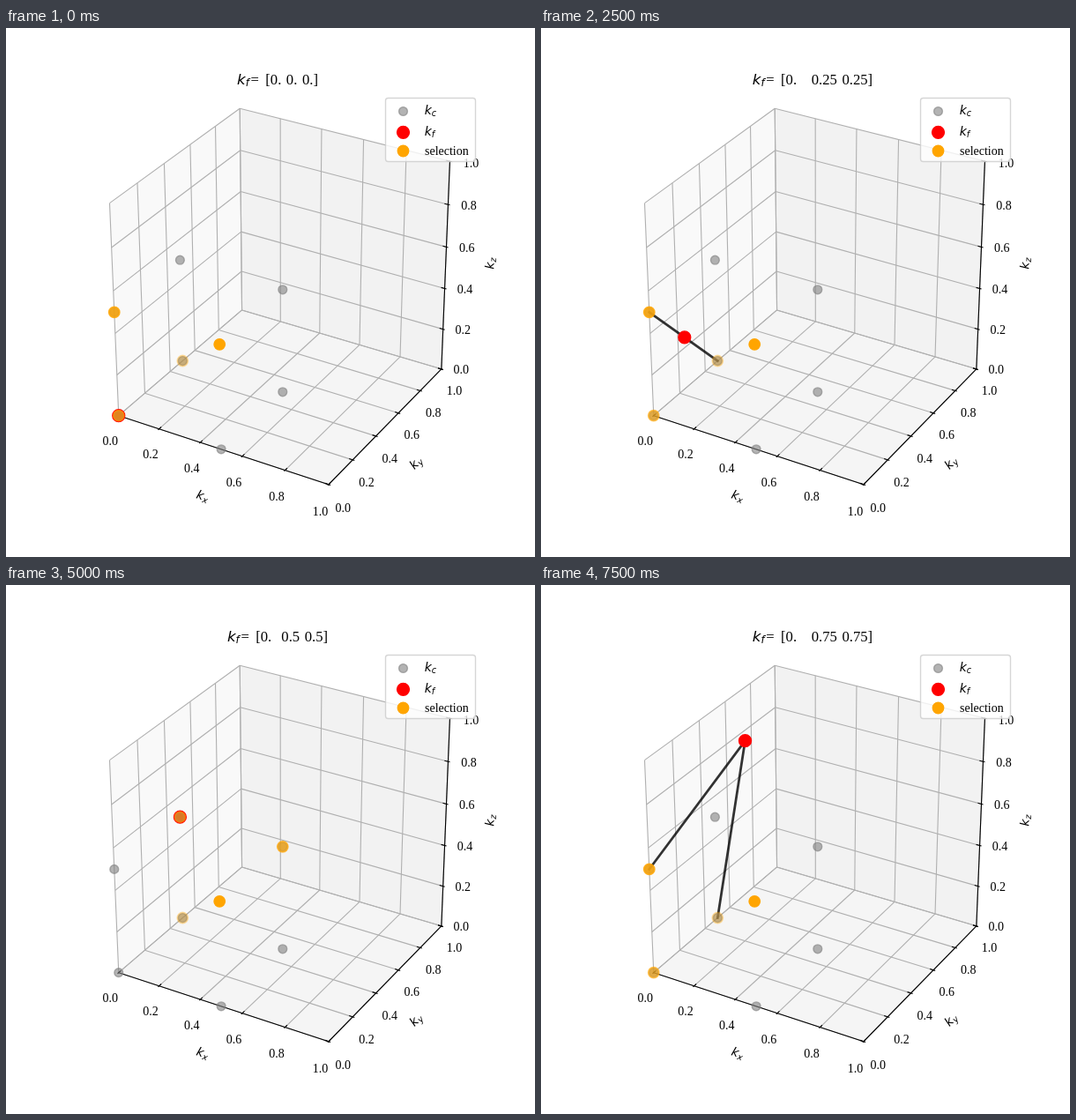
Write an HTML page with a canvas that moves like this. It is 600 px wide and 600 px high and loops after 8000 ms.

```html
<!DOCTYPE html>
<html lang="en">
<head>
<meta charset="utf-8">
<title>k-point interpolation</title>
<style>
html, body { margin: 0; width: 100%; height: 100%; overflow: hidden; background: #fff; }
canvas { display: block; }
</style>
</head>
<body>
<canvas id="c" width="600" height="600"></canvas>
<script>
const ctx = document.getElementById('c').getContext('2d');
const STEP = 500, COUNT = 16;
const SERIF = '"Liberation Serif", "Noto Serif", serif';
const SANS = '"DejaVu Sans", sans-serif';
const TICKS = [0, 0.2, 0.4, 0.6, 0.8, 1];

// Coarse points are numbered 0..7 by the bits x, y, z (each bit is 0.5).
const coarse = [0, 1, 2, 3, 4, 5, 6, 7].map(i => [(i >> 2) / 2, (i >> 1 & 1) / 2, (i & 1) / 2]);
const NEAREST = '5';
// Selected tetrahedron and the two interpolation ends for each fine point.
const picks = ['0125', '0125', '1235', '0135', '0125', '0125', '1235', '0135',
  '2357', '2357', '2357', '0235', '0124', '1237', '1357', '0125'];
const ends = ['', '01', '', '01', '02', '12', '13', '03',
  '', '23', '', '23', '02', '12', '13', '12'];

// Perspective view at elevation 30, azimuth -60.
function project([x, y, z]) {
  x -= 0.5; y -= 0.5; z -= 0.5;
  const w = 10 - 1.056 * (0.433 * x - 0.75 * y + 0.5 * z);
  const k = 2750 / w;
  return {
    x: 313.8 + k * (0.866 * x + 0.5 * y),
    y: 296.8 - k * (-0.25 * x + 0.433 * y + 0.866 * z),
    w
  };
}

function path(points) {
  ctx.beginPath();
  for (const p of points) {
    const q = project(p);
    ctx.lineTo(q.x, q.y);
  }
}

function line(a, b, color, width) {
  path([a, b]);
  ctx.strokeStyle = color;
  ctx.lineWidth = width;
  ctx.stroke();
}

function pane(color, ...corners) {
  path(corners);
  ctx.fillStyle = color;
  ctx.fill();
}

function dot(x, y, r, color, alpha) {
  ctx.globalAlpha = alpha;
  ctx.fillStyle = ctx.strokeStyle = color;
  ctx.lineWidth = 1.39;
  ctx.beginPath();
  ctx.arc(x, y, r, 0, 2 * Math.PI);
  ctx.fill();
  ctx.stroke();
  ctx.globalAlpha = 1;
}

const grayDot = (x, y) => dot(x, y, 4.91, '#808080', 0.6);
const redDot = (x, y) => dot(x, y, 6.94, '#f00', 1);
const orangeDot = (x, y, alpha) => dot(x, y, 6.21, '#ffa500', alpha);

function text(str, x, y, font, align = 'left') {
  ctx.font = font;
  ctx.textAlign = align;
  ctx.fillStyle = '#000';
  ctx.fillText(str, x, y);
}

// Letter k with a subscript; x, y is the left end of the baseline.
function kSub(sub, x, y, size) {
  text('k', x, y, `italic ${size}px ${SANS}`);
  text(sub, x + size * 0.579, y + size * 0.16, `italic ${size * 0.7}px ${SANS}`);
}

function axisLabel(sub, x, y, angle) {
  ctx.save();
  ctx.translate(x, y);
  ctx.rotate(angle * Math.PI / 180);
  kSub(sub, -7, 4.5, 13.9);
  ctx.restore();
}

function axis(at, inward, from, to) {
  ctx.lineCap = 'square';
  line(at(0), at(1), '#000', 1.11);
  ctx.lineCap = 'butt';
  for (const t of TICKS) {
    const p = at(t), d = inward;
    line(p.map((v, i) => v + d[i] / 60), p.map((v, i) => v - d[i] / 120), '#000', 1.11);
    const q = project(p);
    const dx = from[0] + (to[0] - from[0]) * t;
    const dy = from[1] + (to[1] - from[1]) * t;
    text(t.toFixed(1), q.x + dx, q.y + dy + 4.6, `14px ${SERIF}`, 'center');
  }
}

function drawBox() {
  pane('#f9f9f9', [0, 0, 0], [0, 1, 0], [0, 1, 1], [0, 0, 1]);
  pane('#f2f2f2', [0, 1, 0], [1, 1, 0], [1, 1, 1], [0, 1, 1]);
  pane('#f5f5f5', [0, 0, 0], [1, 0, 0], [1, 1, 0], [0, 1, 0]);
  ctx.lineJoin = 'round';
  for (const t of TICKS) {
    for (const corners of [
      [[t, 0, 0], [t, 1, 0], [t, 1, 1]],
      [[1, t, 0], [0, t, 0], [0, t, 1]],
      [[0, 0, t], [0, 1, t], [1, 1, t]]
    ]) {
      path(corners);
      ctx.strokeStyle = '#b0b0b0';
      ctx.lineWidth = 1.11;
      ctx.stroke();
    }
  }
  axis(t => [t, 0, 0], [0, 1, 0], [-9.6, 28.3], [-9.6, 30.2]);
  axis(t => [1, t, 0], [-1, 0, 0], [16.2, 26.2], [14.6, 24.2]);
  axis(t => [1, 1, t], [-1, 0, 0], [22.3, 0.3], [24, 1.8]);
  axisLabel('x', 223, 531, 18.2);
  axisLabel('y', 465, 493, -45.7);
  axisLabel('z', 549, 266.5, -87.7);
}

function drawLegend() {
  ctx.beginPath();
  ctx.roundRect(430.5, 79.5, 102, 72, 3);
  ctx.fillStyle = 'rgba(255,255,255,0.8)';
  ctx.fill();
  ctx.strokeStyle = 'rgba(204,204,204,0.8)';
  ctx.lineWidth = 1.39;
  ctx.stroke();
  grayDot(450.5, 94.5);
  redDot(450.5, 118.3);
  orangeDot(450.5, 139.5, 1);
  kSub('c', 474.7, 98, 13.9);
  kSub('f', 474.7, 122, 13.9);
  text('selection', 475, 143.5, `14px ${SERIF}`);
}

// Array notation with fractions padded to a common width.
function format(values) {
  const parts = values.map(v => String(v).split('.')[1] || '');
  const width = Math.max(...parts.map(p => p.length));
  return '[' + values.map((v, i) => '0.' + parts[i].padEnd(width)).join(' ') + ']';
}

function drawTitle(values) {
  const size = 16.67, font = `${size}px ${SERIF}`;
  const str = format(values);
  ctx.wordSpacing = '1.4px';
  ctx.font = font;
  const lead = 32.2;
  const left = 308 - (lead + ctx.measureText(str).width) / 2;
  text(str, left + lead, 63.5, font);
  ctx.wordSpacing = '0px';
  text('=', left + 20.2, 63.5, font, 'center');
  kSub('f', left, 63.5, size);
}

function drawPicks(pick) {
  const pts = [...pick].map(i => project(coarse[i])).sort((a, b) => b.w - a.w);
  const far = pts[0].w, near = pts[3].w;
  for (const p of pts) orangeDot(p.x, p.y, 1 - 0.7 * (p.w - near) / (far - near));
}

function drawCoarse() {
  for (const p of coarse.map(project).sort((a, b) => b.w - a.w)) grayDot(p.x, p.y);
}

function draw(n) {
  const fine = [0, Math.floor(n / 4) / 4, n % 4 / 4];
  ctx.fillStyle = '#fff';
  ctx.fillRect(0, 0, 600, 600);
  drawBox();

  ctx.lineCap = 'square';
  for (const i of ends[n]) line(fine, coarse[i], 'rgba(0,0,0,0.8)', 2.78);
  ctx.lineCap = 'butt';

  const k = project(fine);
  redDot(k.x, k.y);
  // The group holding the nearest point lies on top.
  const layers = [drawCoarse, () => drawPicks(picks[n])];
  if (!picks[n].includes(NEAREST)) layers.reverse();
  layers.forEach(f => f());

  drawTitle(fine);
  drawLegend();
}

const start = performance.now();
function tick() {
  const t = Math.max(0, performance.now() - start);
  draw(Math.floor(t / STEP) % COUNT);
  requestAnimationFrame(tick);
}
tick();
</script>
</body>
</html>
```
